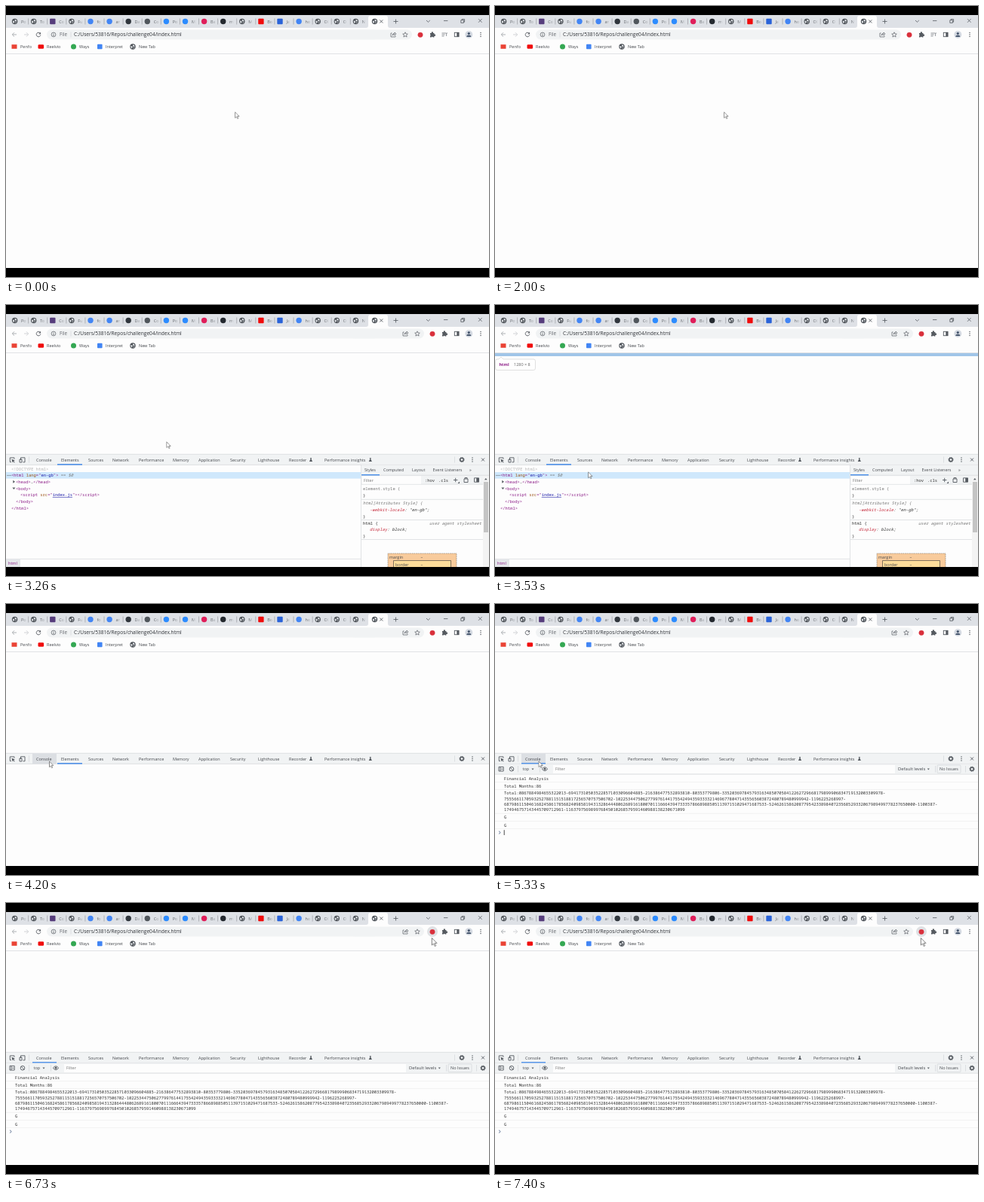
An HTML page for the animation above (8000 ms loop, 640 by 360 pixels).

```html
<!DOCTYPE html>
<html lang="en">
<head>
<meta charset="utf-8">
<title>Browser console</title>
<style>
html, body { margin: 0; width: 100%; height: 100%; overflow: hidden; background: #000; }
svg { display: block; width: 640px; height: 360px; }
text { font-family: "Open Sans", "Noto Sans", sans-serif; font-size: 5.5px; fill: #44474c; white-space: pre; }
.url { font-size: 6.6px; fill: #303338; }
.code text { font: 5.48px "Noto Sans Mono", monospace; fill: #303030; }
.code .tag, .tag { fill: #8b1a86; }
.code .attr { fill: #9a5010; }
.code .val { fill: #1c1ca8; }
.code .prop { fill: #c4283a; }
.code .dim { fill: #b5b5b5; }
.code .mid { fill: #777; }
.code .it { font-style: italic; }
.line { stroke: #cfd2d6; stroke-width: .6; fill: none; }
.faint { stroke: #ebebeb; stroke-width: .6; }
.ico { stroke: #555a60; stroke-width: .9; fill: none; }
.dark { fill: #555a60; }
.blue { fill: #1a73e8; }

.t { animation: 8s step-end infinite; }
#shift { animation-name: shift; }
#media { animation-name: media; }
#hover { animation-name: hover; }
#tools { animation-name: tools; }
#early { animation-name: early; }
#full { animation-name: full; }
#overlay { animation-name: overlay; }
#elTab { animation-name: elTab; }
#press { animation-name: press; }
#console { animation-name: console; }
#log { animation-name: log; }
#caret { animation-name: caret; }
#cursor { animation: move 8s ease-in-out infinite, hide 8s step-end infinite; }

@keyframes shift { 0% { transform: none; } 26.625%, 100% { transform: matrix(1, 0, 0, 1, 16, 0); } }
@keyframes media { 0% { opacity: 1; } 26.625%, 100% { opacity: 0; } }
@keyframes hover { 0% { opacity: 0; } 84.125%, 100% { opacity: 1; } }
@keyframes tools { 0% { opacity: 0; } 33.25%, 100% { opacity: 1; } }
@keyframes early { 0% { opacity: 0; } 35% { opacity: 1; } 37.5%, 100% { opacity: 0; } }
@keyframes full { 0% { opacity: 0; } 37.5% { opacity: 1; } 51.625%, 100% { opacity: 0; } }
@keyframes overlay { 0% { opacity: 0; } 43.25% { opacity: 1; } 47.5%, 100% { opacity: 0; } }
@keyframes elTab { 0% { opacity: 1; } 53.375%, 100% { opacity: 0; } }
@keyframes press { 0% { opacity: 0; } 50.75% { opacity: 1; } 67%, 100% { opacity: 0; } }
@keyframes console { 0% { opacity: 0; } 53.375%, 100% { opacity: 1; } }
@keyframes log { 0% { opacity: 0; } 55%, 100% { opacity: 1; } }
@keyframes caret {
  0% { opacity: 0; } 60.75% { opacity: 1; } 67.5% { opacity: 0; } 74.125% { opacity: 1; }
  80.75% { opacity: 0; } 87.5% { opacity: 1; } 92.5%, 100% { opacity: 0; }
}
@keyframes hide { 0% { opacity: 1; } 25.75% { opacity: 0; } 38.25%, 100% { opacity: 1; } }
@keyframes move {
  0%, 38.25% { transform: matrix(1, 0, 0, 1, 303.6, 141); }
  43.25%, 45% { transform: matrix(1, 0, 0, 1, 123.6, 222); }
  51.5%, 66.5% { transform: matrix(1, 0, 0, 1, 57.4, 209); }
  70.75%, 73.5% { transform: matrix(1, 0, 0, 1, 330, 150); }
  76.2%, 77.2% { transform: matrix(1, 0, 0, 1, 545.5, 84); }
  84.125%, 100% { transform: matrix(1.25, 0, 0, 1.25, 564.3, 46.4); }
}
</style>
</head>
<body>
<svg viewBox="0 0 640 360">
  <defs>
    <linearGradient id="fade"><stop offset=".3" stop-color="#5f6368"/><stop offset="1" stop-color="#5f6368" stop-opacity=".15"/></linearGradient>
    <g id="globe">
      <circle r="3.7" fill="#4b5056"/>
      <path d="M-2.7-.9Q-1-.9-.4 0T-.9 1.6L-1.3 2.8Q-3 1.4-2.7-.9ZM.1-2.8Q2.2-2.6 2.8-.6L1.2.2 0-.7ZM1 1.2L2.5 1Q2 2.3.8 2.7Z" fill="#dfe2e6"/>
    </g>
    <g id="gear">
      <circle r="2.2" fill="none" stroke="#555a60" stroke-width="1.5"/>
      <circle r="3.1" fill="none" stroke="#555a60" stroke-width="1" stroke-dasharray="1.2 1.23"/>
    </g>
    <path id="x" class="ico" d="M-2-2L2 2M2-2L-2 2"/>
    <g id="dots" class="dark"><circle cy="-2.4" r=".75"/><circle r=".75"/><circle cy="2.4" r=".75"/></g>
    <path id="flask" class="dark" d="M-1-2.6H1V-2.1H.6V-.5L2.1 2.4H-2.1L-.6-.5V-2.1H-1Z"/>
    <path id="down" class="dark" d="M-1.5-.8H1.5L0 1.1Z"/>
  </defs>

  <rect width="640" height="360"/>
  <rect y="12" width="640" height="336" fill="#fdfdfd"/>

  <!-- tab strip -->
  <rect y="12" width="640" height="17" fill="#dee1e6"/>
  <path d="M477 29Q480 29 480 26V16Q480 13 483 13H503Q506 13 506 16V26Q506 29 509 29Z" fill="#fdfdfd"/>
  <g id="tabs"></g>
  <use href="#x" x="497.3" y="20.5"/>
  <path class="ico" d="M513.5 20.5H519.5M516.5 17.5V23.5M557 19L559.4 21.4 561.8 19M580 19.6H585.4M602.8 18.8H606.4V22.4H602.8ZM604 18.8V17.6H607.6V21.2H606.4M626 17.2L630.6 21.8M630.6 17.2L626 21.8" style="stroke-width:.8"/>

  <!-- address bar -->
  <rect x="54" y="31.5" width="440" height="13" rx="6.5" fill="#f1f3f4"/>
  <path class="ico" d="M14 38H8.4M11 35.3L8.3 38 11 40.7" style="stroke:#a4a8ac"/>
  <path class="ico" d="M24 38H29.6M27 35.3L29.7 38 27 40.7" style="stroke:#cccfd2"/>
  <path class="ico" d="M45.3 36.4A2.8 2.8 0 1 0 45.8 38.6"/><path class="dark" d="M46 34.8V37.6H43.2Z"/>
  <circle class="ico" cx="63" cy="38" r="2.9" style="stroke-width:.7"/><path class="ico" d="M63 36.3V36.9M63 37.6V39.8"/>
  <text x="71" y="40.3" style="font-size:6.3px;fill:#5f6368">File</text>
  <path class="line" d="M86 34.5V41.5"/>
  <g id="shift" class="t">
    <rect x="440" y="31.5" width="98" height="13" rx="6.5" fill="#f1f3f4"/>
    <circle id="hover" class="t" cx="549" cy="38" r="7" fill="#dfe1e4"/>
    <path class="ico" d="M511.5 36H510V41H516V39.5M512 39Q512.3 36.3 515 36.3V35L517 37 515 39V37.8Q513 37.6 512 39" style="stroke-width:.7"/>
    <path class="ico" d="M529 34.8L530 37 532.3 37.2 530.5 38.8 531.1 41.1 529 39.8 526.9 41.1 527.5 38.8 525.7 37.2 528 37Z" style="stroke-width:.7"/>
    <circle cx="549" cy="38.3" r="3.4" fill="#d9303c"/>
    <path class="dark" d="M562 36H563.8A1.2 1.2 0 1 1 566 36H567.4V37.6A1.2 1.2 0 1 1 567.4 39.8V41.4H565.6A1 1 0 0 0 563.8 41.4H562V39.6A1 1 0 0 0 562 37.8Z"/>
  </g>
  <path id="media" class="ico t" d="M577.5 36H583M577.5 38H581.5M577.5 40H580.5M583.6 40V36H585" style="stroke:#888d92"/>
  <text class="url" x="90" y="40.3">C:/Users/53816/Repos/challenge04/index.html</text>
  <rect class="ico" x="594.3" y="35.3" width="5.6" height="5.4"/><rect class="dark" x="597.3" y="35" width="3" height="6"/>
  <circle cx="613.3" cy="38" r="5" fill="#d5dae2"/><circle cx="613.3" cy="36.6" r="1.6" fill="#46566d"/><path d="M610.3 41Q610.4 38.8 613.3 38.8T616.3 41Z" fill="#46566d"/>
  <use href="#dots" x="629" y="38"/>

  <!-- bookmarks -->
  <rect x="7.5" y="51.2" width="7" height="5.6" fill="#ea4335"/>
  <rect x="42.5" y="51.2" width="7.6" height="5.6" rx="1.4" fill="#f00c0c"/>
  <circle cx="89.5" cy="54" r="3.5" fill="#34a853"/>
  <rect x="121" y="50.7" width="6.6" height="6.6" rx=".8" fill="#4285f4"/>
  <use href="#globe" x="168" y="54"/>
  <text x="19" y="56">Penfo</text><text x="54" y="56">Reelvio</text><text x="97" y="56">Ways</text>
  <text x="132" y="56">Interpret</text><text x="176" y="56">New Tab</text>
  <path class="line" d="M0 63.5H640"/>

  <!-- element highlight -->
  <g id="overlay" class="t">
    <rect y="64" width="640" height="4" fill="#a0c5e8"/>
    <path d="M5 72L8 69 11 72H51Q53.5 72 53.5 74.5V84Q53.5 86.5 51 86.5H3Q.5 86.5.5 84V74.5Q.5 72 3 72Z" fill="#fefefe" stroke="#cdcdcd" stroke-width=".6"/>
    <text x="5.5" y="81.4" class="tag" style="font-weight:700">html</text>
    <text x="25" y="81.4" style="fill:#666">1280 × 8</text>
  </g>

  <!-- developer tools -->
  <g id="tools" class="t">
    <rect y="198" width="640" height="150" fill="#fdfdfd"/>
    <rect y="198" width="640" height="14.5" fill="#f1f3f4"/>
    <path class="line" d="M0 198.3H640M0 212.4H640M30.5 201.5V209.5M594.5 201.5V209.5"/>
    <rect id="press" class="t" x="35" y="198.6" width="32" height="13.6" fill="#dcdfe3"/>
    <path class="ico" d="M7 208.6H5.3V202.9H11V204.6"/><path class="dark" d="M7.4 204.8L11.9 206.5 10 207.2 11.7 208.9 11 209.5 9.4 207.9 8.7 209.4Z"/>
    <path class="ico" d="M19.5 206V202.8H25V208.8H22.5M18 205H21V209H18Z"/>
    <g id="devTabs"></g>
    <use href="#flask" x="404" y="205.6"/><use href="#flask" x="482.8" y="205.6"/>
    <use href="#gear" x="604" y="205.5"/><use href="#dots" x="618" y="205.5"/><use href="#x" x="632" y="205.5"/>
    <rect id="elTab" class="t blue" x="68" y="211.3" width="33" height="1.2"/>

    <g id="early" class="t">
      <g class="pane"></g>
      <rect y="239.6" width="470" height="8.6" fill="#cfe8fc"/>
      <g class="code">
        <text x="7" y="219.9" class="dim">&lt;!DOCTYPE html&gt;</text>
        <text x="7" y="228.4" class="tag">&lt;html <tspan class="attr">lang</tspan>="<tspan class="val">en-gb</tspan>"&gt;</text>
        <text x="13" y="237" class="tag">&lt;head&gt;<tspan class="mid">…</tspan>&lt;/head&gt;</text>
        <text x="13" y="245.6" class="tag">&lt;body&gt;<tspan class="mid"> == <tspan class="it">$0</tspan></tspan></text>
        <text x="7" y="262.2" class="tag">&lt;/html&gt;</text>
        <text x="583" y="234.5">:hov</text><text x="601.5" y="234.5">.cls</text>
      </g>
      <g class="dark"><circle cx="2" cy="244" r=".6"/><circle cx="4" cy="244" r=".6"/><circle cx="6" cy="244" r=".6"/></g>
      <rect x="472" y="227.2" width="106" height="10.6" fill="#fdfdfd"/><text x="474" y="234.5" style="fill:#777">Filter</text>
      <path class="ico" d="M621 232.5H626.4M623.7 229.8V235.2"/><path class="dark" d="M629 234.5V237H626.5Z"/>
      <rect x="20" y="337.6" width="19" height="10.4" fill="#e4e7ea"/>
      <text x="3" y="345" class="tag">html</text><text x="23" y="345" class="tag">body</text>
    </g>

    <g id="full" class="t">
      <g class="pane"></g>
      <rect y="222" width="470" height="8.6" fill="#cfe8fc"/>
      <g class="code">
        <text x="7" y="219.9" class="dim">&lt;!DOCTYPE html&gt;</text>
        <text x="7" y="228.4" class="tag">&lt;html <tspan class="attr">lang</tspan>="<tspan class="val">en-gb</tspan>"&gt;<tspan class="mid"> == <tspan class="it">$0</tspan></tspan></text>
        <text x="13" y="237" class="tag">&lt;head&gt;<tspan class="mid">…</tspan>&lt;/head&gt;</text>
        <text x="13" y="245.6" class="tag">&lt;body&gt;</text>
        <text x="19" y="254.4" class="tag">&lt;script <tspan class="attr">src</tspan>="<tspan class="val" text-decoration="underline">index.js</tspan>"&gt;&lt;/script&gt;</text>
        <text x="13" y="263" class="tag">&lt;/body&gt;</text>
        <text x="7" y="271.6" class="tag">&lt;/html&gt;</text>
        <text x="555" y="234.5">:hov</text><text x="573" y="234.5">.cls</text>
        <text x="473" y="246" class="mid">element.style {</text><text x="473" y="254.7">}</text>
        <text x="473" y="265.4" class="mid it">html[Attributes Style] {</text>
        <text x="482" y="274" class="it"><tspan class="prop">-webkit-locale</tspan>: "en-gb";</text><text x="473" y="282.5">}</text>
        <text x="473" y="291.8">html {</text><text x="630" y="291.8" text-anchor="end" class="it mid">user agent stylesheet</text>
        <text x="482" y="300.2" class="it"><tspan class="prop">display</tspan>: block;</text><text x="473" y="309">}</text>
      </g>
      <path class="dark" d="M9.3 232.8L12 234.8 9.3 236.8ZM8.4 242.4H12.4L10.4 245Z"/>
      <g class="dark"><circle cx="2" cy="226.3" r=".6"/><circle cx="4" cy="226.3" r=".6"/><circle cx="6" cy="226.3" r=".6"/></g>
      <rect x="472" y="227.2" width="78" height="10.6" fill="#fdfdfd"/><text x="474" y="234.5" style="fill:#777">Filter</text>
      <path class="ico" d="M593 232.5H598.4M595.7 229.8V235.2M607 231H612V235.5H607ZM608 231V229.5H611V231M620.5 229.8H626.5V235.2H620.5ZM624 230V235"/>
      <path class="dark" d="M601 234.5V237H598.5ZM623.5 230H626.5V235H623.5Z"/>
      <path class="line" d="M471 258.3H632M471 285.5H632M471 311.5H632"/>
      <rect x="633" y="235" width="6" height="67" fill="#c4c4c4"/>
      <path d="M506 348V330H597V348" fill="#f8cb9c" stroke="#555" stroke-width=".5" stroke-dasharray="1.5 1"/>
      <path d="M513.5 348V339.5H589.5V348" fill="#fddc9a" stroke="#333" stroke-width=".6"/>
      <text x="508" y="337">margin</text><text x="549.5" y="337">–</text><text x="516" y="347">border</text><text x="549.5" y="347">–</text>
      <rect y="337.6" width="19" height="10.4" fill="#e4e7ea"/>
      <text x="3" y="345" class="tag">html</text>
    </g>

    <g id="console" class="t">
      <rect class="blue" x="35" y="211.3" width="32" height="1.2"/>
      <rect y="212.7" width="640" height="13.3" fill="#f1f3f4"/>
      <rect x="77" y="214" width="453" height="11" fill="#fdfdfd"/>
      <path class="line" d="M0 226.2H640M30.5 215V223.5M59.5 215V223.5M583.5 215V223.5M623.5 215V223.5"/>
      <path class="ico" d="M5 216.4H11.2V222H5ZM7 216.4V222M8.2 219.2H10.5"/>
      <circle class="ico" cx="22" cy="219.2" r="2.8"/><path class="ico" d="M20.1 217.2L24 221.2"/>
      <path class="ico" d="M62.3 219.2Q66 214.4 69.7 219.2 66 224 62.3 219.2Z"/><circle class="dark" cx="66" cy="219.2" r="1.4"/>
      <text x="36.5" y="221.2">top</text><use href="#down" x="50" y="219.3"/>
      <text x="80" y="221.2" style="fill:#777">Filter</text>
      <text x="534" y="221.2" style="font-size:5.8px">Default levels</text><use href="#down" x="574.3" y="219.3"/>
      <rect class="line" x="586" y="214" width="31" height="10.6" rx="1"/><text x="589" y="221.2">No Issues</text>
      <use href="#gear" x="632" y="219.2"/>
      <g id="log" class="code t"></g>
      <path class="ico" d="M5 301.7L7.3 303.6 5 305.5" style="stroke:#5a6f8f"/>
      <rect id="caret" class="t" x="11.8" y="300.2" width=".7" height="6.8"/>
    </g>
  </g>

  <path id="cursor" d="M0 0V7.6L1.8 6 3.1 8.8 4.3 8.2 3 5.5H5.3Z" fill="#fff" stroke="#555" stroke-width=".6"/>
</svg>
<script>
const put = (el, html) => { el.innerHTML = html; };
const text = (x, y, s, extra = "") => `<text x="${x}" y="${y}" ${extra}>${s}</text>`;
const $ = id => document.getElementById(id);

// g = globe, c = circle, s = square; then colour and visible start of the title
const tabs = [
  "g  Po", "g  To", "s #563d7c Co", "g  Fu", "c #4285f4 fo", "c #4285f4 ar", "c #30363d Da", "c #50565c Co",
  "c #2d8cff Po", "c #2d8cff M", "c #e01e5a Ba", "c #24292f m", "g  M", "s #f00c0c Bo", "s #2a63d8 Ja",
  "c #4285f4 ho", "g  Ol", "g  O", "g  N", "g  "
];
put($("tabs"), tabs.map((tab, i) => {
  const [kind, color, title] = tab.split(" ");
  const x = 11.6 + 25.1 * i;
  const icon = kind === "g" ? `<use href="#globe" x="${x}" y="20.5"/>`
    : kind === "c" ? `<circle cx="${x}" cy="20.5" r="3.7" fill="${color}"/>`
    : `<rect x="${x - 3.7}" y="16.8" width="7.4" height="7.4" rx="1" fill="${color}"/>`;
  const rule = i < 18 ? `<path d="M${x + 18} 16.5V24.5" stroke="#8d9196" stroke-width=".6"/>` : "";
  return icon + rule + (title ? text(x + 8.4, 22.5, title, 'style="fill:url(#fade)"') : "");
}).join(""));

const devTabs = {
  Console: 40, Elements: 73, Sources: 109, Network: 141, Performance: 176, Memory: 221, Application: 255,
  Security: 297, Lighthouse: 334, Recorder: 375, "Performance insights": 422
};
put($("devTabs"), Object.entries(devTabs).map(([s, x]) => text(x, 207.6, s)).join(""));

const styleTabs = { Styles: 475, Computed: 500, Layout: 538, "Event Listeners": 565.5, "»": 614 };
const pane = `<rect x="471" y="212.7" width="169" height="25.5" fill="#f1f3f4"/>
  <rect x="632" y="226.5" width="8" height="121.5" fill="#f3f3f3"/>
  <path class="dark" d="M634 232.2L635.8 230 637.6 232.2Z"/>
  <path class="line" d="M470.5 212.5V348M471 226.2H640M471 238.2H632M0 337.4H470"/>
  <rect class="blue" x="471" y="225.2" width="24" height="1.1"/>` +
  Object.entries(styleTabs).map(([s, x]) => text(x, 221.3, s)).join("");
document.querySelectorAll(".pane").forEach(el => put(el, pane));

const log = [
  [233.5, "Financial Analysis"],
  [243.5, "Total Months:86"],
  [253.4, "Total:0867884984655322013-694173105035228571033096604885-216386477532893810-80353779806-33520369784579316348507058412262729668179899906834719132003309978-"],
  [260.5, "75556611705932527881151518817256570757506702-102253447506277997614417554249435933332146967780471435565603872480789480999942-1196225268997-"],
  [267.7, "6879861150461682458617856824098581943132864448062689161800701116664394733357866898850511397151029471687533-52462615862087795423389840723568529332067989499778237650000-1100387-"],
  [274.8, "174946757143445709712961-116379756989976845010268579591460988138230671099"],
  [285.4, "G"],
  [295.5, "G"]
];
put($("log"), log.map(([y, s]) => text(12, y, s)).join("") +
  [236.6, 246.6, 278.3, 288.6, 298.6].map(y => `<path class="faint" d="M0 ${y}H640"/>`).join(""));
</script>
</body>
</html>
```
